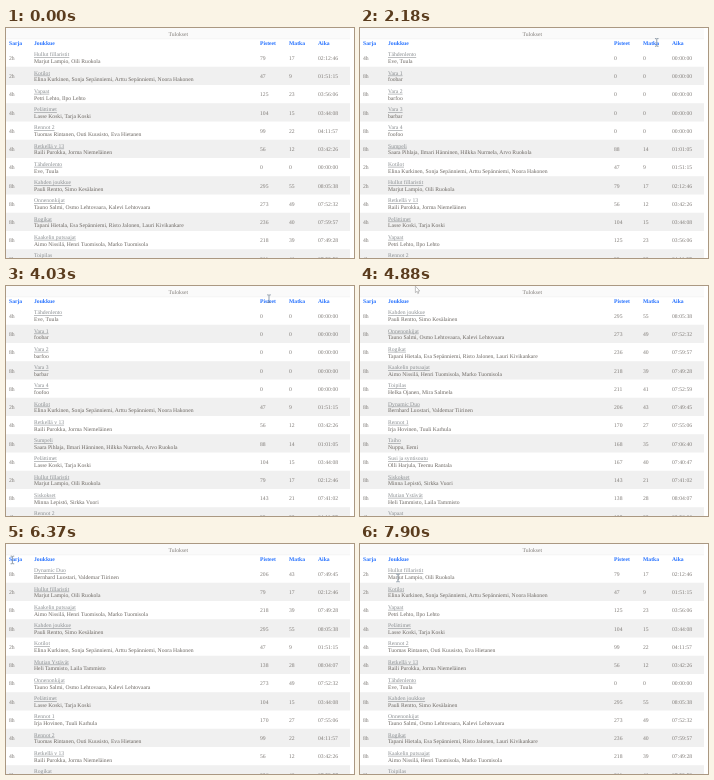
Animation, 348 px wide and 230 px high, one loop 8 s. Source, as an HTML page:

```html
<!DOCTYPE html>
<html lang="fi">
<head>
<meta charset="utf-8">
<title>Tulokset</title>
<style>
  html, body { margin: 0; width: 100%; height: 100%; overflow: hidden; background: #fff; }
  svg { display: block; width: 348px; height: 230px; }
  text { font: 5.65px "Liberation Serif", serif; text-rendering: geometricPrecision; fill: #807c78; }
  .head { font-weight: bold; fill: #2470ff; }
  .team { fill: #8b8f92; text-decoration: underline; text-decoration-thickness: .4px; }
  .members { fill: #6b6661; }
</style>
</head>
<body>
<svg viewBox="0 0 348 230">
  <rect width="344" height="10.8" fill="#fafafa"/>
  <path d="M0 10.8H344" stroke="#ececec" stroke-width=".6"/>
  <text x="172.3" y="7.8" text-anchor="middle">Tulokset</text>
  <g id="head"></g>
  <g id="rows"></g>
  <circle id="click" r="5" fill="#ffe600" fill-opacity=".65"/>
  <g id="cursor">
    <path id="beam" d="M-1.8-3.8H-.4L0-3.4 .4-3.8H1.8M0-3.4V3.4M-1.8 3.8H-.4L0 3.4 .4 3.8H1.8" fill="none" stroke="#678" stroke-width=".7"/>
    <path id="arrow" d="M-2.6-3.8V2.6L-1.2 1.4-.2 3.6 .8 3.1-.2 1H1.8Z" fill="#fff" stroke="#999" stroke-width=".6"/>
  </g>
</svg>
<script>
const LOOP = 8000, TICK = 77, PRESS = 240, ROW_TOP = 20.5, ROW_HEIGHT = 18.25;
const $ = id => document.getElementById(id);

// series | team | members | points | distance | time, best of each series first
const results = `2h|Hullut fillaristit|Marjut Lampio, Oili Ruokola|79|17|02:12:46
2h|Kotilot|Elina Kurkinen, Sonja Sepänniemi, Arttu Sepänniemi, Noora Hakonen|47|9|01:51:15
4h|Vapaat|Petri Lehto, Ilpo Lehto|125|23|03:56:06
4h|Pelättimet|Lasse Koski, Tarja Koski|104|15|03:44:08
4h|Rennot 2|Tuomas Rintanen, Outi Kuusisto, Eva Hietanen|99|22|04:11:57
4h|Retkellä v 13|Raili Purokka, Jorma Niemeläinen|56|12|03:42:26
4h|Tähdenlento|Eve, Tuula|0|0|00:00:00
8h|Kahden joukkue|Pauli Rentto, Simo Kesälainen|295|55|08:05:38
8h|Onnenonkijat|Tauno Salmi, Osmo Lehtovaara, Kalevi Lehtovaara|273|49|07:52:32
8h|Rogikat|Tapani Hietala, Esa Sepänniemi, Risto Jalonen, Lauri Kivikankare|236|40|07:59:57
8h|Kaakelin putsaajat|Aimo Nissilä, Henri Tuomisola, Marko Tuomisola|218|39|07:49:28
8h|Toipilas|Helka Ojanen, Mira Salmela|211|41|07:52:59
8h|Dynamic Duo|Bernhard Luostari, Valdemar Tiirinen|206|43|07:49:45
8h|Rennot 1|Irja Hovinen, Tuuli Karhula|170|27|07:55:06
8h|Taiho|Nuppu, Eemi|168|35|07:06:40
8h|Susi ja syntisoutu|Olli Harjula, Teemu Rantala|167|40|07:40:47
8h|Siskokset|Minna Lepistö, Sirkka Vuori|143|21|07:41:02
8h|Mutian Ystävät|Heli Tammisto, Laila Tammisto|138|28|08:04:07
8h|Sumpeli|Saara Pihlaja, Ilmari Hänninen, Hilkka Nurmela, Arvo Ruokola|88|14|01:01:05`;
const spares = ['foobar', 'barfoo', 'barbar', 'foofoo'].map((members, i) => `8h|Vara ${i + 1}|${members}|0|0|00:00:00`);
const teams = [...results.split('\n'), ...spares].map(line => {
  const [series, team, members, points, distance, time] = line.split('|');
  return { series, team, members, points, distance, time };
});

const columns = {
  series: { x: 3, title: 'Sarja' },
  team: { x: 28, title: 'Joukkue' },
  points: { x: 254, title: 'Pisteet' },
  distance: { x: 283, title: 'Matka' },
  time: { x: 312, title: 'Aika' }
};

// The pointer glides to each stop; at a heading it presses, then the table sorts by that column.
const stops = [
  { leave: 140, arrive: 220, x: 294, y: 92 },
  { leave: 520, arrive: 1210, x: 316.5, y: 13.5, press: 1380, sort: 1760, key: 'time' },
  { leave: 1940, arrive: 2320, x: 295.5, y: 14.5, press: 2560, sort: 2730, key: 'distance' },
  { leave: 2810, arrive: 3470, x: 263, y: 12.7, press: 3790, sort: 4090, key: 'points' },
  { leave: 4500, arrive: 4710, x: 58, y: 4 },
  { leave: 4880, arrive: 5340, x: 38.5, y: 14.5, press: 5570, sort: 5950, key: 'team' },
  { leave: 6180, arrive: 6400, x: 5.5, y: 16, press: 6730, sort: 7040, key: 'series' },
  { leave: 7360, arrive: 7880, x: 38, y: 34 }
];

const label = (x, y, content, type = '') => `<text x="${x}" y="${y}" class="${type}">${content}</text>`;
$('head').innerHTML = Object.values(columns).map(({ x, title }) => label(x, 17.2, title, 'head')).join('');

function compare(key) {
  if (key === 'points') return (a, b) => b.points - a.points;
  if (key === 'distance') return (a, b) => a.distance - b.distance;
  return (a, b) => a[key].localeCompare(b[key], 'fi');
}

function rowMarkup(entry, i) {
  const y = ROW_TOP + i * ROW_HEIGHT;
  const stripe = i % 2 ? `<rect y="${y}" width="344" height="${ROW_HEIGHT}" fill="#f0f0f0"/>` : '';
  const cells = ['series', 'points', 'distance', 'time'].map(key => label(columns[key].x, y + 11.4, entry[key]));
  return stripe + cells.join('') + label(columns.team.x, y + 7.8, entry.team, 'team')
    + label(columns.team.x, y + 14.5, entry.members, 'members');
}

function cursorAt(t) {
  let x = 285, y = 118.5;
  for (const stop of stops) {
    if (t < stop.leave) break;
    const elapsed = Math.floor((t - stop.leave) / TICK) * TICK;
    const eased = 1 - (1 - Math.min(1, elapsed / (stop.arrive - stop.leave))) ** 3;
    x += (stop.x - x) * eased;
    y += (stop.y - y) * eased;
  }
  return { x, y };
}

let shownKey;
function draw(t) {
  const key = stops.findLast(stop => t >= stop.sort)?.key ?? 'series';
  if (key !== shownKey) {
    shownKey = key;
    $('rows').innerHTML = [...teams].sort(compare(key)).slice(0, 12).map(rowMarkup).join('');
  }

  const show = (id, visible) => { $(id).style.display = visible ? '' : 'none'; };
  const { x, y } = cursorAt(t);
  const position = `translate(${x} ${y})`;
  $('cursor').setAttribute('transform', position);
  $('click').setAttribute('transform', position);
  show('cursor', t >= stops[0].leave);
  show('beam', y >= 8);
  show('arrow', y < 8);
  show('click', stops.some(({ press, sort }) => t >= press && t < Math.min(press + PRESS, sort)));
}

const begin = performance.now();
function frame() {
  draw((performance.now() - begin) % LOOP);
  requestAnimationFrame(frame);
}
frame();
</script>
</body>
</html>
```
